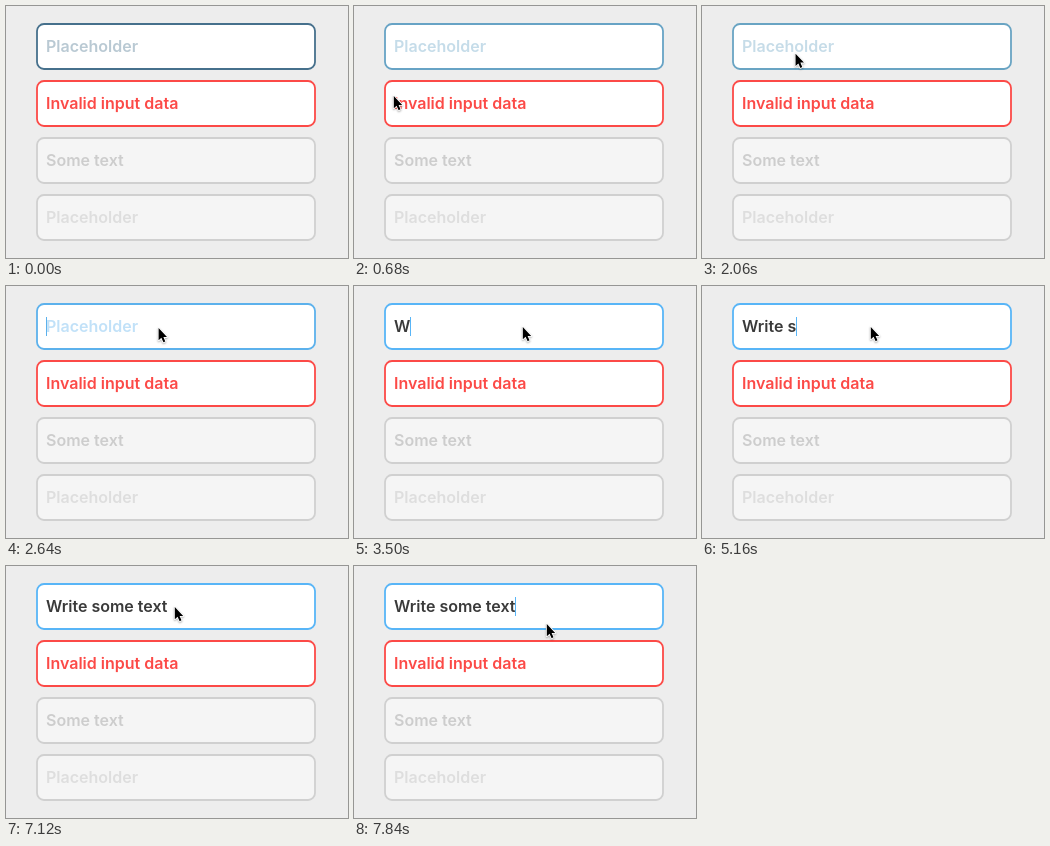
Animation of 342x252 px, one loop 8000 ms. Source, as an HTML page with a canvas:

```html
<!DOCTYPE html>
<html lang="en">
<head>
<meta charset="utf-8">
<title>Text field states</title>
<style>
  html, body { margin: 0; width: 100%; height: 100%; overflow: hidden; background: #ededed; }
  canvas { display: block; }
</style>
</head>
<body>
<canvas id="stage" width="342" height="252"></canvas>
<script>
const ctx = document.getElementById('stage').getContext('2d');
const LOOP = 8000;
const LEFT = 40;
const ENTER = 480, HOVER = 1540, FOCUS = 2500, LEAVE = 7560;

const BURSTS = [
  { text: 'W', at: 3500, step: 0 },
  { text: 'rite ', at: 3800, step: 130 },
  { text: 'some ', at: 5160, step: 110 },
  { text: 'text', at: 6160, step: 153 }
];

const TINT = {
  from: [70, 112, 140],
  moves: [
    { at: ENTER, span: 280, to: [111, 175, 211] },
    { at: HOVER + 260, span: 200, to: [105, 164, 195] },
    { at: FOCUS, span: 200, to: [88, 181, 247] }
  ]
};

const POINTER = {
  from: [-10, 98],
  moves: [
    { at: ENTER, span: 400, to: [88, 80] },
    { at: HOVER, span: 600, to: [93, 45] },
    { at: FOCUS, span: 200, to: [168, 40] },
    { at: LEAVE, span: 280, to: [192, 57] }
  ]
};

function ease(p) {
  const q = Math.min(1, Math.max(0, p));
  return q * q * (3 - 2 * q);
}

// Value of a track after applying each eased move in turn
function valueAt({ from, moves }, t) {
  return moves.reduce((now, { at, span, to }) => {
    const p = ease((t - at) / span);
    return now.map((v, i) => v + (to[i] - v) * p);
  }, from);
}

function typedAt(t) {
  let text = '', lastKey = FOCUS;
  for (const { text: part, at, step } of BURSTS) {
    [...part].forEach((char, i) => {
      const key = at + i * step;
      if (key > t) return;
      text += char;
      lastKey = key;
    });
  }
  return { text, lastKey };
}

function field(row, label, border, ink, fill) {
  const y = 18 + row * 57;
  ctx.beginPath();
  ctx.roundRect(31, y, 278, 45, 7);
  ctx.fillStyle = fill;
  ctx.fill();
  ctx.lineWidth = 1.8;
  ctx.strokeStyle = border;
  ctx.stroke();
  ctx.fillStyle = ink;
  ctx.fillText(label, LEFT, y + 28);
}

function caret(t, { text, lastKey }, color) {
  if (t < FOCUS || (t - lastKey) % 1000 >= 500) return;
  ctx.fillStyle = color;
  ctx.fillRect(Math.floor(LEFT + ctx.measureText(text).width), 31, 1, 19);
}

const arrow = new Path2D('M0 0V12.2L2.8 9.7L4.8 14.2L6.7 13.3L4.8 8.9H8.4Z');

function pointer([x, y]) {
  ctx.save();
  ctx.translate(x + 0.8, y + 1);
  ctx.lineJoin = 'round';
  ctx.lineWidth = 1.8;
  ctx.strokeStyle = '#fff';
  ctx.shadowColor = 'rgba(0,0,0,0.3)';
  ctx.shadowBlur = 2;
  ctx.shadowOffsetY = 1;
  ctx.stroke(arrow);
  ctx.shadowColor = 'transparent';
  ctx.fillStyle = '#000';
  ctx.fill(arrow);
  ctx.restore();
}

function draw(t) {
  ctx.fillStyle = '#ededed';
  ctx.fillRect(0, 0, 342, 252);
  ctx.font = '600 16px Inter, "Open Sans", sans-serif';

  const tint = valueAt(TINT, t).map(Math.round).join(',');
  const accent = `rgb(${tint})`;
  const typed = typedAt(t);
  const ink = typed.text ? '#3a3a3a' : `rgba(${tint},0.38)`;

  field(0, typed.text || 'Placeholder', accent, ink, '#fff');
  field(1, 'Invalid input data', '#fc4a47', '#fc4a47', '#fff');
  field(2, 'Some text', '#d0d0d0', '#cdcdcd', '#f5f5f5');
  field(3, 'Placeholder', '#d0d0d0', '#dedede', '#f5f5f5');

  caret(t, typed, accent);
  if (t >= ENTER) pointer(valueAt(POINTER, t));
}

let start;
function tick(now) {
  start ??= now;
  draw((now - start) % LOOP);
  requestAnimationFrame(tick);
}
draw(0);
requestAnimationFrame(tick);
</script>
</body>
</html>
```
